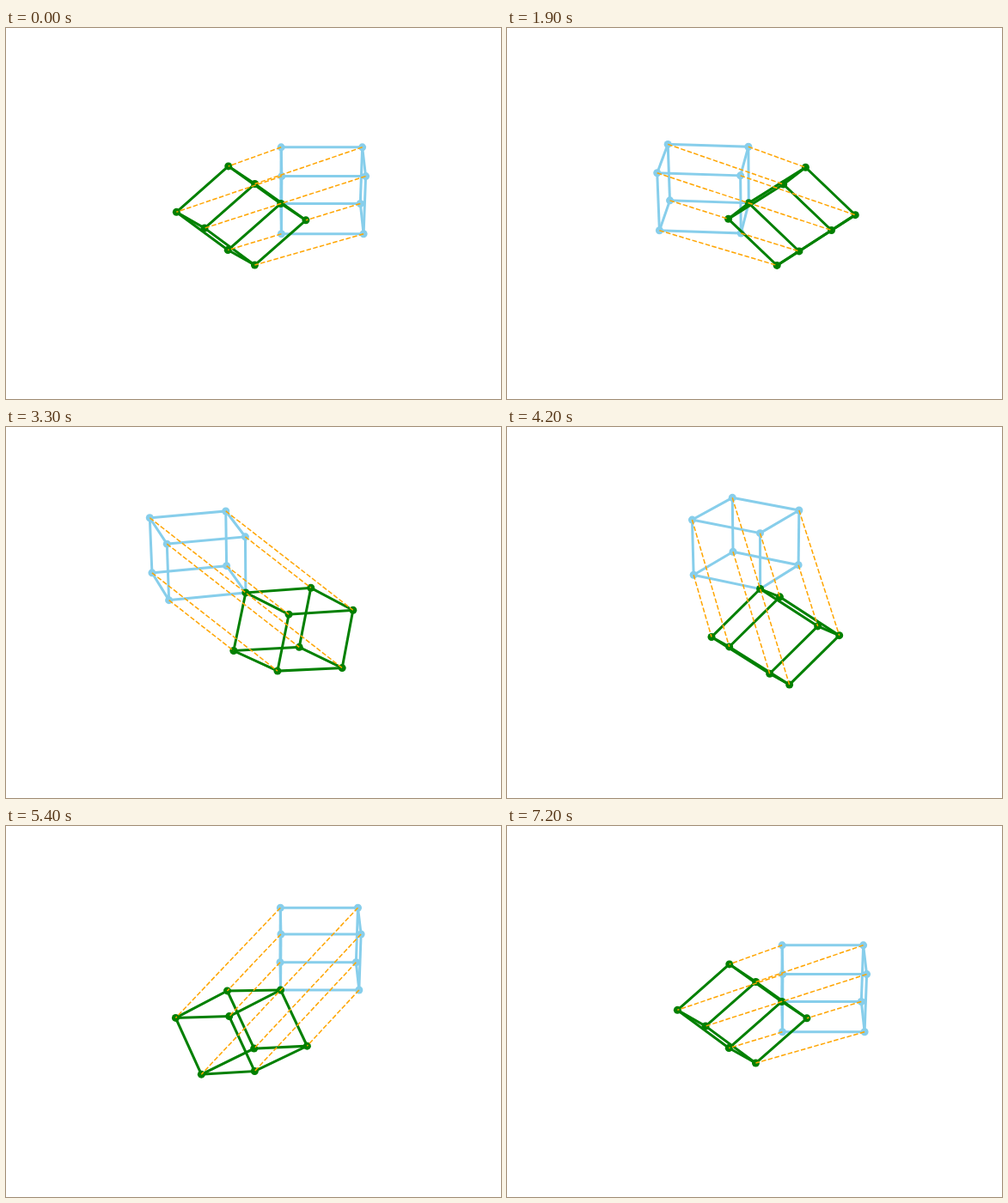
An HTML page with a canvas for the animation above (7300 ms loop, 576 by 432 pixels).

```html
<!DOCTYPE html>
<html lang="en">
<head>
<meta charset="utf-8">
<title>Cube reflection</title>
<style>
  html, body { margin: 0; width: 100%; height: 100%; overflow: hidden; background: #fff; }
  canvas { display: block; }
</style>
</head>
<body>
<canvas id="stage" width="576" height="432"></canvas>
<script>
const ctx = document.getElementById('stage').getContext('2d');
const STEP = 100, STEPS = 73, TURN = 5;
const ELEV = Math.PI / 6, DIST = 10;
const VIEW = { x: 301.3, y: 213.9, sx: 2413, sy: 1798 };

// Unit cube corners; the bits of the index are x, y and z.
const cube = Array.from({ length: 8 }, (_, i) => [i & 1, i >> 1 & 1, i >> 2 & 1]);
const edges = [];
for (let i = 0; i < 8; i++)
  for (const bit of [1, 2, 4]) if (!(i & bit)) edges.push([i, i | bit]);

// Mirror in the plane x + y + z = 0.
const mirror = p => {
  const shift = 2 / 3 * (p[0] + p[1] + p[2]);
  return p.map(v => v - shift);
};
const mirrored = cube.map(mirror);

// Perspective view of a point, camera orbiting at azimuth az.
function project([x, y, z], az) {
  const wx = (x + 0.2) * 0.3788, wy = (y + 0.2) * 0.3788, wz = (z + 0.255) * 0.4067;
  const c = Math.cos(az), s = Math.sin(az);
  const right = wy * c - wx * s, near = wx * c + wy * s;
  const up = wz * Math.cos(ELEV) - near * Math.sin(ELEV);
  const depth = DIST - near * Math.cos(ELEV) - wz * Math.sin(ELEV);
  return [VIEW.x + VIEW.sx * right / depth, VIEW.y - VIEW.sy * up / depth];
}

function line(a, b) {
  ctx.beginPath();
  ctx.moveTo(...a);
  ctx.lineTo(...b);
  ctx.stroke();
}

function drawCube(points, color) {
  ctx.strokeStyle = ctx.fillStyle = color;
  ctx.lineWidth = 3;
  ctx.lineCap = 'square';
  ctx.setLineDash([]);
  for (const [i, j] of edges) line(points[i], points[j]);
  for (const [x, y] of points) {
    ctx.beginPath();
    ctx.arc(x, y, 4.5, 0, 2 * Math.PI);
    ctx.fill();
  }
}

function draw(step) {
  const az = step * TURN * Math.PI / 180;
  const from = cube.map(p => project(p, az));
  const to = mirrored.map(p => project(p, az));
  ctx.fillStyle = '#fff';
  ctx.fillRect(0, 0, 576, 432);
  drawCube(from, 'skyblue');
  drawCube(to, 'green');
  ctx.strokeStyle = 'orange';
  ctx.lineWidth = 1.5;
  ctx.lineCap = 'butt';
  ctx.setLineDash([5.55, 2.4]);
  from.forEach((p, i) => { if (i) line(p, to[i]); });
}

const start = performance.now();
function tick() {
  draw(Math.floor((performance.now() - start) / STEP) % STEPS);
  requestAnimationFrame(tick);
}
tick();
</script>
</body>
</html>
```
